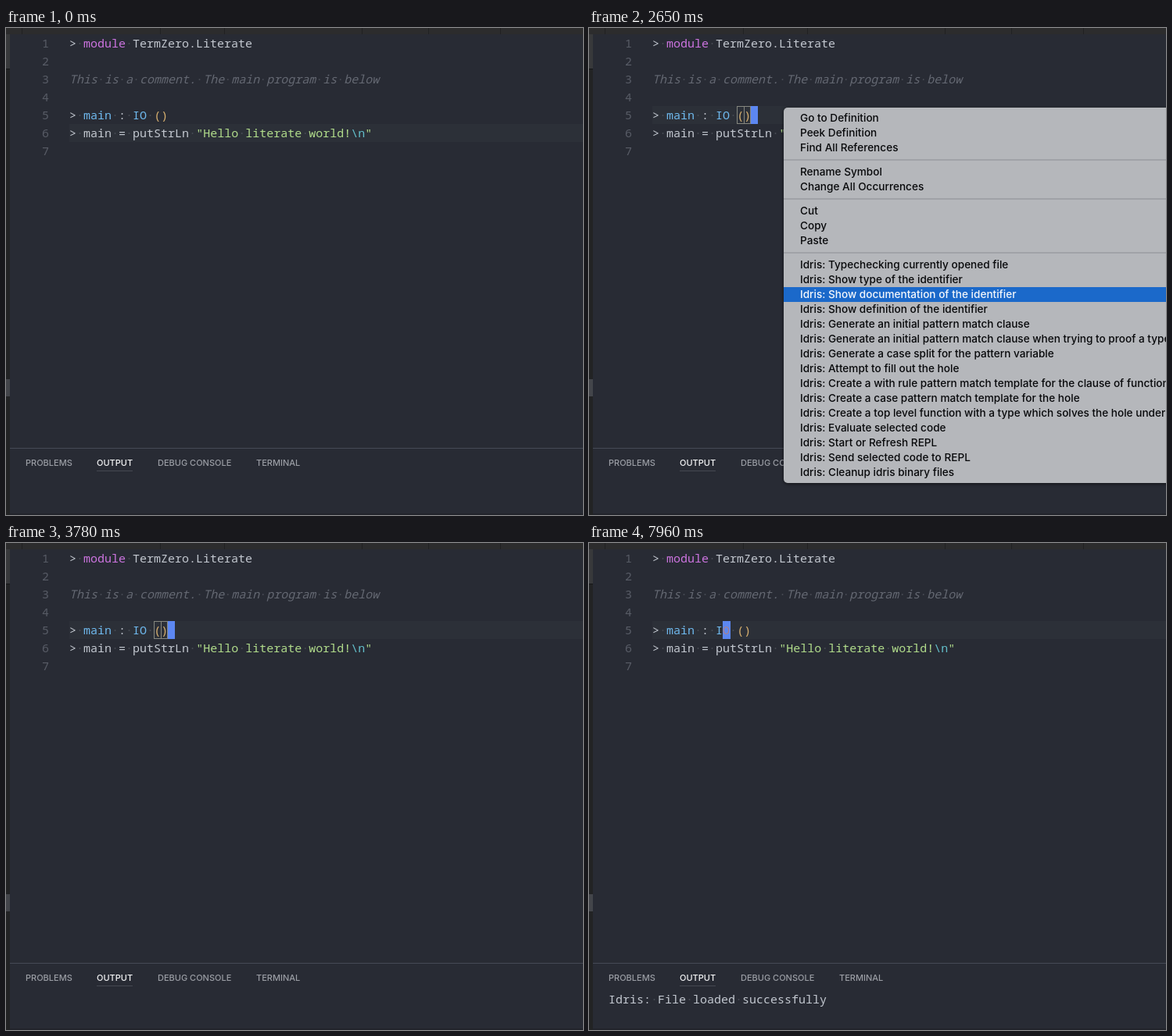
Recreate the animation shown at these times as an HTML page. Size 738 px wide and 624 px high, loop 8000 ms.

```html
<!DOCTYPE html>
<html lang="en">
<head>
<meta charset="utf-8">
<title>Editor context menu</title>
<style>
  html, body { margin: 0; width: 100%; height: 100%; overflow: hidden; background: #282b34; }
  svg { display: block; width: 738px; height: 624px; }
  text { white-space: pre; }
  .code { font: 450 15px "Noto Sans Mono", "DejaVu Sans Mono", monospace; fill: #c3c8d0; }
  .num { fill: #585c66; text-anchor: end; }
  .tab { font: 450 11px Inter, sans-serif; fill: #9a9da4; }
  .item { font: 450 13.6px Inter, sans-serif; fill: #08090b; }
  .sheet { filter: drop-shadow(0 1px 2px #0009); }
</style>
</head>
<body>
<svg id="stage" viewBox="0 0 738 624"></svg>
<script>
const LOOP = 8000, COL = 9, LEFT = 81, ROW = 23, TOP = 100 - 4 * ROW;
const stage = document.getElementById('stage');

function add(parent, tag, attrs = {}, text) {
  const el = document.createElementNS('http://www.w3.org/2000/svg', tag);
  for (const k in attrs) el.setAttribute(k, attrs[k]);
  if (text !== undefined) el.textContent = text;
  parent.appendChild(el);
  return el;
}
const box = (parent, x, y, width, height, fill, more) =>
  add(parent, 'rect', { x, y, width, height, fill, ...more });
const show = (el, on) => el.setAttribute('visibility', on ? 'visible' : 'hidden');
const rowY = line => TOP + (line - 1) * ROW;

// Spaces are drawn as faint dots, as in an editor that renders whitespace.
function codeLine(x, y, parts) {
  const line = add(stage, 'text', { x, y, class: 'code' });
  for (const [str, fill, style = 'normal'] of parts)
    for (const bit of str.split(/( )/))
      if (bit) add(line, 'tspan', bit === ' ' ? { fill: '#484c55' } : { fill, 'font-style': style },
        bit === ' ' ? '·' : bit);
  return line;
}

// Window frame
box(stage, 0, 0, 738, 624, '#282b34');
box(stage, 0, 0, 738, 8, '#2c2c2d');
for (const x of [20, 197, 279, 455, 540, 632]) box(stage, x, 0, 1, 8, '#202122');
box(stage, 0, 8, 5, 616, '#222324');
box(stage, 0, 8, 5, 44, '#38393b');
box(stage, 0, 52, 5, 1, '#151617');
box(stage, 0, 450, 5, 22, '#43454a');
box(stage, 5, 622, 733, 2, '#22242b');

// Editor
const active = box(stage, LEFT, 0, 738 - LEFT, ROW, '#2c3038');
const cursor = box(stage, 0, 0, COL + 1, ROW, '#5c87f2');
const TEXT = '#c3c8d0', BLUE = '#6fb9ee', GREEN = '#b1dc8b', GOLD = '#d8b06f';
const source = {
  1: [['> ', TEXT], ['module', '#cd74e0'], [' TermZero.Literate', TEXT]],
  3: [['This is a comment. The main program is below', '#646872', 'italic']],
  5: [['> ', TEXT], ['main', BLUE], [' : ', TEXT], ['IO', BLUE], [' ', TEXT], ['()', GOLD]],
  6: [['> main = putStrLn ', TEXT], ['"Hello literate world!', GREEN], ['\\n', '#63bfcb'], ['"', GREEN]]
};
for (let n = 1; n <= 7; n++) {
  const y = rowY(n) + 17;
  add(stage, 'text', { x: 55, y, class: 'code num' }, n);
  if (source[n]) codeLine(LEFT, y, source[n]);
}
const covered = add(stage, 'text', { x: LEFT + 10 * COL, y: rowY(5) + 17, class: 'code' }, 'O');
covered.style.fill = '#a5778f';
const pair = add(stage, 'g', { fill: 'none', stroke: '#85877f' });
for (const col of [12, 13])
  box(pair, LEFT + col * COL + .5, rowY(5) + .5, COL - (col - 12), ROW - 1, 'none');

// Panel
box(stage, 5, 538, 733, 1, '#464a56');
[['PROBLEMS', 25], ['OUTPUT', 116], ['DEBUG CONSOLE', 194], ['TERMINAL', 320]].forEach(([name, x]) => {
  const tab = add(stage, 'text', { x, y: 561, class: 'tab' }, name);
  if (name === 'OUTPUT') tab.style.fill = '#f4f5f6';
});
box(stage, 116, 567, 46, 1, '#454851');
const output = codeLine(25, 590, [['Idris: File loaded successfully', TEXT]]);

// Context menu
const groups = [
  ['Go to Definition', 'Peek Definition', 'Find All References'],
  ['Rename Symbol', 'Change All Occurrences'],
  ['Cut', 'Copy', 'Paste'],
  ['Typechecking currently opened file', 'Show type of the identifier',
    'Show documentation of the identifier', 'Show definition of the identifier',
    'Generate an initial pattern match clause',
    'Generate an initial pattern match clause when trying to proof a type',
    'Generate a case split for the pattern variable', 'Attempt to fill out the hole',
    'Create a with rule pattern match template for the clause of function',
    'Create a case pattern match template for the hole',
    'Create a top level function with a type which solves the hole under cursor',
    'Evaluate selected code', 'Start or Refresh REPL', 'Send selected code to REPL',
    'Cleanup idris binary files'].map(s => 'Idris: ' + s)
];
const menu = add(stage, 'g');
box(menu, 249, 102, 500, 481, '#b5b7bb', { rx: 5, class: 'sheet' });
const mark = box(menu, 249, 0, 489, 19, '#1b69ca');
const items = [];
let mid = 115;
groups.forEach((group, i) => {
  if (i) {
    box(menu, 249, mid - 4, 489, 2, '#a0a2a7');
    mid += 12;
  }
  for (const name of group) {
    items.push({ mid, el: add(menu, 'text', { x: 270, y: mid + 5, class: 'item' }, name) });
    mid += 19;
  }
});

// Timeline, in ms
const CLICK = 1780, OPEN = 1840, HOVER = 2100, FADE = 3225, FADE_LEN = 200;
const LOADED = 4000, MOVE = 7600;
const blink = (t, start) => ((t - start) % 1000 + 1000) % 1000 < 500;
const path = [[HOVER, 115], [2550, 341], [2720, 341], [3000, 303], [LOOP, 303]];

function pointerY(t) {
  const i = path.findIndex(p => t < p[0]);
  if (i < 1) return -1;
  const [t0, y0] = path[i - 1], [t1, y1] = path[i];
  const u = (t - t0) / (t1 - t0);
  return y0 + (y1 - y0) * u * u * (3 - 2 * u);
}

function caret(t) {
  if (t < CLICK) return { line: 6, col: 42, on: blink(t, 300) };
  if (t < MOVE) return { line: 5, col: 14, on: t < 3660 || blink(t, 3660) };
  return { line: 5, col: 10, on: true };
}

function draw(t) {
  const { line, col, on } = caret(t);
  active.setAttribute('y', rowY(line));
  cursor.setAttribute('x', LEFT + col * COL - (col === 14 ? 1 : 0));
  cursor.setAttribute('y', rowY(line));
  show(cursor, on);
  show(covered, t >= MOVE);
  show(pair, t >= CLICK && t < MOVE);
  show(output, t >= LOADED);

  const fade = Math.max(0, Math.min(1, 1 - (t - FADE) / FADE_LEN));
  show(menu, t >= OPEN && fade > 0);
  menu.setAttribute('opacity', fade);
  const y = pointerY(t), pressed = t > 3110 && t < 3170;
  const hit = pressed ? null : items.find(item => Math.abs(item.mid - y) <= 9.5);
  mark.setAttribute('y', hit ? hit.mid - 9 : 0);
  mark.setAttribute('height', hit ? 19 : 0);
  for (const item of items) item.el.style.fill = item === hit ? '#f4f7fb' : '';
}

function tick() {
  draw(performance.now() % LOOP);
  requestAnimationFrame(tick);
}
tick();
</script>
</body>
</html>
```
